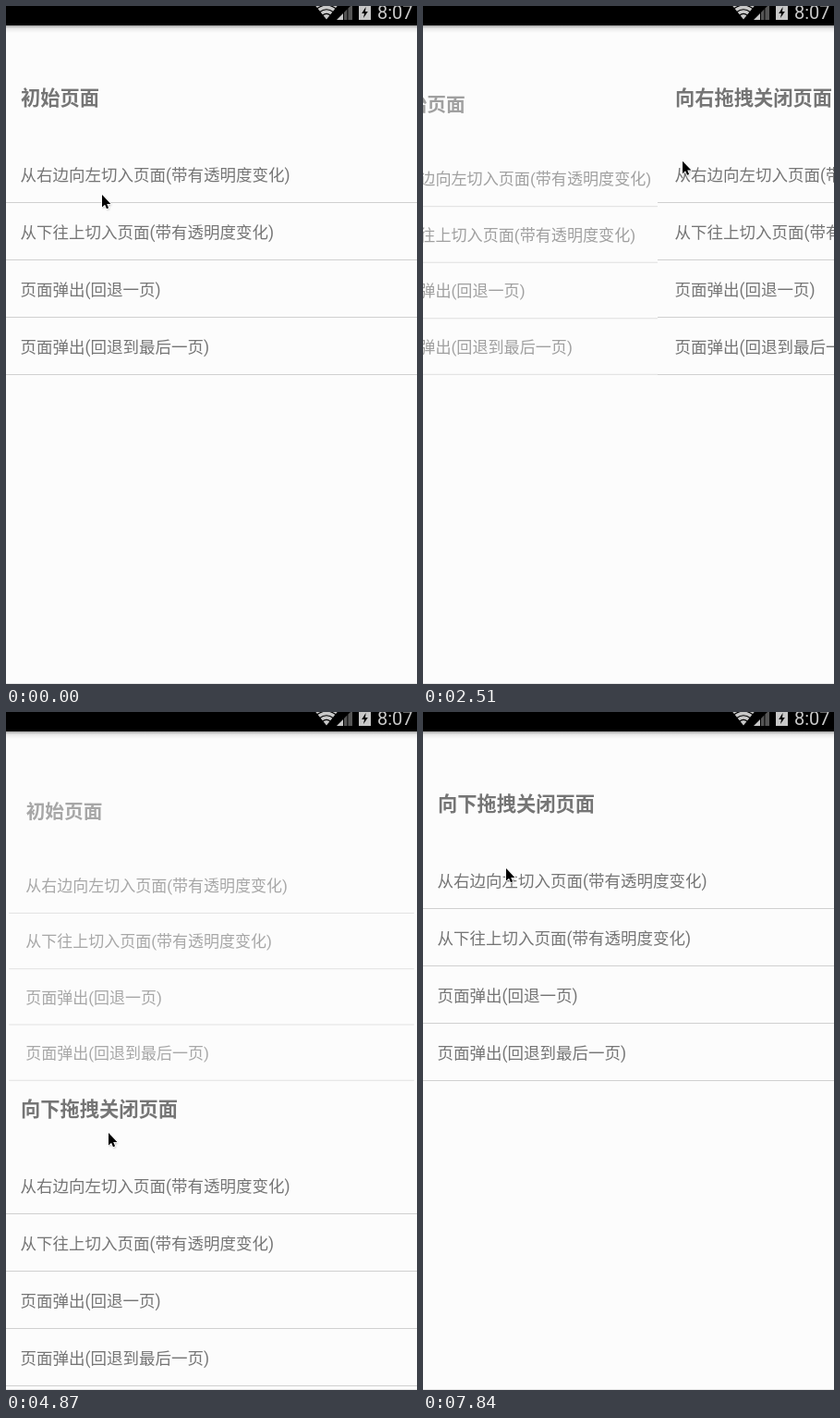
Animation, 445 px wide and 733 px high, one loop 7990 ms. Source, as an HTML page:

```html
<!DOCTYPE html>
<html lang="zh-CN">
<head>
<meta charset="utf-8">
<style>
  html, body { margin: 0; width: 100%; height: 100%; overflow: hidden; background: #fcfcfc; }
  svg { display: block; width: 445px; height: 733px; }
  text { font-family: Roboto, "Noto Sans CJK SC", "Noto Sans CJK JP", sans-serif; fill: #757575; }
  .title { font-size: 21.25px; font-weight: 700; }
  .row { font-size: 17.5px; }
  .clock { font-size: 20px; fill: #c8c8c8; }
</style>
</head>
<body>
<svg viewBox="0 0 445 733" xmlns="http://www.w3.org/2000/svg">
  <defs>
    <linearGradient id="shade" x2="0" y2="1">
      <stop offset="0" stop-color="#000" stop-opacity=".36"/>
      <stop offset=".4" stop-color="#000" stop-opacity=".08"/>
      <stop offset="1" stop-color="#000" stop-opacity="0"/>
    </linearGradient>
    <filter id="soft" x="-50%" y="-50%" width="200%" height="200%">
      <feGaussianBlur stdDeviation=".9"/>
    </filter>
  </defs>
  <rect width="445" height="733" fill="#fcfcfc"/>
  <g id="home"></g>
  <g id="right"></g>
  <g id="down"></g>
  <rect y="732" width="445" height="1" fill="#e6e6e6"/>
  <rect y="21" width="445" height="8" fill="url(#shade)"/>
  <rect width="445" height="21" fill="#000"/>
  <g fill="#c8c8c8">
    <path d="M347 14.5L334.5 -1H359.5Z"/>
    <path d="M336 3.4Q347 -5.4 358 3.4M339.3 6.8Q347 .6 354.7 6.8M342.5 10.2Q347 6.6 351.5 10.2" fill="none" stroke="#000" stroke-width="1.1"/>
    <path d="M358 15L365 8V15Z"/>
    <path d="M366 7L369.4 3.6V15H366ZM370.4 2.6L375 -2V15H370.4Z" fill="#555"/>
    <path d="M382 -1H395V15H382Z"/>
    <path d="M389.6 1L385.2 8H388L387 13L391.8 6H389Z" fill="#000"/>
    <text class="clock" x="402" y="13.5">8:07</text>
  </g>
  <g id="cursor">
    <path d="M1 1.5V15L4 12.2L6 16.7L8 15.8L6.1 11.4H10.4Z" opacity=".35" filter="url(#soft)"/>
    <path d="M0 0V13.5L3.1 10.7L5 15.2L7.1 14.3L5.2 9.9H9.4Z" stroke="#fff" stroke-width="1.6" stroke-linejoin="round" paint-order="stroke"/>
  </g>
</svg>
<script>
const LOOP = 7990, STEPS = 54;
const PAGE = { x: -3, y: 72, w: 451, h: 660 };
const PIVOT = { x: 222.5, y: 390 };
const ROWS = ['从右边向左切入页面(带有透明度变化)', '从下往上切入页面(带有透明度变化)',
  '页面弹出(回退一页)', '页面弹出(回退到最后一页)'];
const $ = id => document.getElementById(id);

function fillPage(id, title, back = '') {
  const list = ROWS.map((label, i) => {
    const y = 212 + 62 * i;
    return `<text class="row" x="15.5" y="${y - 23.5}">${label}</text>
      <rect x="${PAGE.x}" y="${y}" width="${PAGE.w}" height="1" fill="#d0d0d0"/>`;
  });
  $(id).innerHTML = `${back}<text class="title" x="16" y="107">${title}</text>${list.join('')}`;
}
const sheet = `<rect x="${PAGE.x}" y="${PAGE.y}" width="${PAGE.w}" height="${PAGE.h}" fill="#fcfcfc"/>`;
fillPage('home', '初始页面');
fillPage('right', '向右拖拽关闭页面', sheet);
fillPage('down', '向下拖拽关闭页面', sheet);

const clamp = u => Math.max(0, Math.min(1, u));
const smooth = u => u * u * (3 - 2 * u);
const settle = u => 1 - (1 - u) ** 2;

// Each gesture: when it starts and how long it lasts, in steps
const open = start => ({ start, span: 2, to: 0, ease: settle });
const drag = (start, span, to) => ({ start, span, to, ease: smooth });
const release = (start, span, to) => ({ start, span, to, ease: settle });

const rightMoves = [open(2.4), drag(7, 4, 241), drag(11, 8, 260), release(19.35, 3, PAGE.w)];
const downMoves = [open(25.1), drag(29, 4, 330), release(34, 2.5, 0),
  drag(37, 5, 370), release(42, 3, PAGE.h), open(48.4)];

const offset = (closed, moves, k) => moves.reduce(
  (v, m) => v + (m.to - v) * m.ease(clamp((k - m.start) / m.span)), closed);

// Resting points of the pointer: step, x, y
const stops = [[0, 104, 204], [1, 80, 185], [3, 80, 185], [7, 24, 160], [11, 265, 155], [19, 284, 170],
  [22, 250, 196], [25, 105, 243], [28, 100, 108], [29, 100, 125], [33, 111, 455], [37, 135, 221],
  [42, 150, 591], [47, 88, 244], [49, 88, 244], [53, 90, 169]];

function pointer(k) {
  const i = Math.max(1, stops.findIndex(s => s[0] >= k));
  const [a, ax, ay] = stops[i - 1], [b, bx, by] = stops[i];
  const u = smooth((k - a) / (b - a));
  return [ax + (bx - ax) * u, ay + (by - ay) * u];
}

function place(id, x, y, shown = true) {
  $(id).setAttribute('transform', `translate(${x} ${y})`);
  $(id).setAttribute('visibility', shown ? 'visible' : 'hidden');
}

function draw(t) {
  const k = Math.min(STEPS - 1, Math.floor((t + 16) / (LOOP / STEPS)));
  const x = offset(PAGE.w, rightMoves, k), y = offset(PAGE.h, downMoves, k);
  const px = x / PAGE.w, py = y / PAGE.h;
  const cover = 1 - Math.min(px, py);
  const scale = 1 - 0.055 * cover;
  const shift = -0.3 * PAGE.w * (1 - px);

  $('home').setAttribute('transform',
    `translate(${PIVOT.x + shift} ${PIVOT.y}) scale(${scale}) translate(${-PIVOT.x} ${-PIVOT.y})`);
  $('home').setAttribute('opacity', 1 - 0.75 * cover);
  $('home').setAttribute('visibility', cover < 1 ? 'visible' : 'hidden');
  place('right', x, 0, px < 1);
  place('down', 0, y, py < 1);
  place('cursor', ...pointer(k));
}

const start = performance.now();
function tick() {
  draw((performance.now() - start) % LOOP);
  requestAnimationFrame(tick);
}
tick();
</script>
</body>
</html>
```
